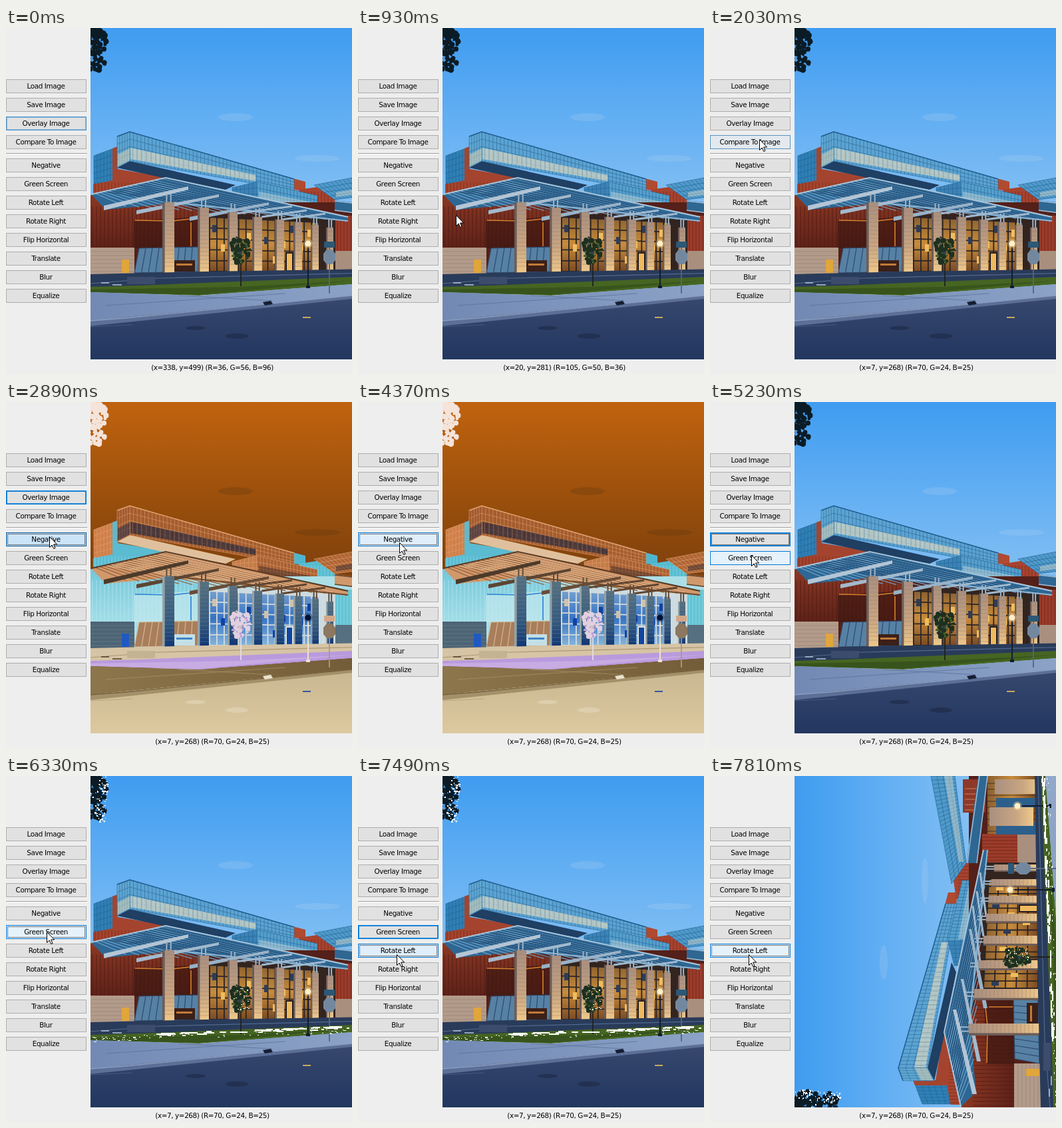
These frames come from a looping animation (520 px wide and 520 px high, 8 s). An HTML page:

```html
<!DOCTYPE html>
<html lang="en">
<head>
<meta charset="utf-8">
<title>Image editor</title>
<style>
  html, body { margin: 0; width: 100%; height: 100%; overflow: hidden; background: #eee; }
  svg { display: block; }
  text { font: 10.4px "DejaVu Sans", sans-serif; letter-spacing: -.4px; text-anchor: middle; fill: #000; }
</style>
</head>
<body>
<svg id="stage" width="520" height="520" viewBox="0 0 520 520">
  <defs>
    <linearGradient id="sky" x1="0" y1="0" x2="0" y2="1">
      <stop offset="0" stop-color="#3f9cf0"/><stop offset=".35" stop-color="#63aff3"/>
      <stop offset=".75" stop-color="#8cc4f3"/><stop offset="1" stop-color="#94c8f2"/>
    </linearGradient>
    <linearGradient id="road" x1="0" y1="0" x2="0" y2="1">
      <stop offset="0" stop-color="#3a4a70"/><stop offset="1" stop-color="#22365f"/>
    </linearGradient>
    <linearGradient id="walk" x1="0" y1="0" x2="1" y2="0">
      <stop offset="0" stop-color="#7289b4"/><stop offset="1" stop-color="#93a9cb"/>
    </linearGradient>
    <linearGradient id="stone" x1="0" y1="0" x2="0" y2="1">
      <stop offset="0" stop-color="#a98f80"/><stop offset=".6" stop-color="#c8a582"/>
      <stop offset="1" stop-color="#efc98a"/>
    </linearGradient>
    <linearGradient id="glow" x1="0" y1="0" x2="0" y2="1">
      <stop offset="0" stop-color="#8a6030"/><stop offset=".5" stop-color="#c78c3c"/>
      <stop offset="1" stop-color="#7a4a22"/>
    </linearGradient>
    <linearGradient id="wall" x1="0" y1="0" x2="0" y2="1">
      <stop offset="0" stop-color="#8d3822"/><stop offset="1" stop-color="#5c2118"/>
    </linearGradient>
  </defs>
  <svg x="127" y="0" width="393" height="498">
    <g id="photo"><g id="scene" transform="translate(-127 0)"></g></g>
  </svg>
  <path d="M0 188.5H122" stroke="#a0a0a0"/>
  <path d="M0 189.5H122" stroke="#fff"/>
  <g id="panel"></g>
  <text id="status" x="310" y="514"></text>
  <path id="cursor" d="M.5 .5V16.5L4.2 13 6.8 18.5 9 17.5 6.6 12H11.6Z" fill="#fff" stroke="#000"/>
</svg>
<script>
const $ = id => document.getElementById(id);
const LOOP = 8000;

/* ---------- picture ---------- */
let seed = 7;
const rnd = () => (seed = (seed * 16807) % 2147483647) / 2147483647;
const poly = (fill, pts, extra = '') => `<polygon fill="${fill}" points="${pts}" ${extra}/>`;
const rect = (fill, x, y, w, h) => `<rect fill="${fill}" x="${x}" y="${y}" width="${w}" height="${h}"/>`;
const line = (color, d, w = 1, extra = '') => `<path d="${d}" fill="none" stroke="${color}" stroke-width="${w}" ${extra}/>`;
const repeat = (n, f) => Array.from({ length: n }, (_, i) => f(i)).join('');

// Quad with nx by ny cells; corners clockwise from top left
function grid(fill, color, a, b, c, d, nx, ny, w = .6) {
  const at = (p, q, k) => (p[0] + (q[0] - p[0]) * k).toFixed(1) + ' ' + (p[1] + (q[1] - p[1]) * k).toFixed(1);
  let path = '';
  for (let i = 0; i <= nx; i++) path += `M${at(a, b, i / nx)}L${at(d, c, i / nx)}`;
  for (let j = 0; j <= ny; j++) path += `M${at(a, d, j / ny)}L${at(b, c, j / ny)}`;
  return poly(fill, [a, b, c, d].join(' ')) + line(color, path, w);
}

function leaves(fill, x, y, rx, ry, n, size) {
  return repeat(n, () => {
    const a = rnd() * 6.283, r = Math.sqrt(rnd());
    return `<circle fill="${fill}" cx="${(x + rx * r * Math.cos(a)).toFixed(1)}" cy="${(y + ry * r * Math.sin(a)).toFixed(1)}" r="${(size * (.5 + rnd())).toFixed(1)}"/>`;
  });
}

const stripes = (color, x, y, w, h, step) =>
  line(color, repeat(Math.floor(w / step), i => `M${x + i * step} ${y}v${h}`), .8);

const column = (x, y, w, foot) =>
  rect('#9db5c9', x + w * .3, y - 13, 2, 14) + rect('#9db5c9', x + w * .65, y - 13, 2, 14) +
  rect('url(#stone)', x, y, w, foot - y) +
  line('#8d7461', repeat(Math.floor((foot - y) / 6), i => `M${x} ${y + 6 * i}h${w}`), .4) +
  rect('#6c5c58', x, y, w * .2, foot - y);

const lamp = (x, y, foot) =>
  line('#141c2c', `M${x} ${y + 4}V${foot}`, 2) + rect('#141c2c', x - 3, foot - 3, 6, 4) +
  `<circle cx="${x}" cy="${y}" r="7" fill="#ffd890" opacity=".35"/><circle cx="${x}" cy="${y}" r="4.5" fill="#fff0c8"/>`;

function drawScene() {
  const sky = rect('url(#sky)', 127, 0, 498, 400) +
    '<g fill="#b5d3f0" opacity=".22"><ellipse cx="345" cy="134" rx="26" ry="6"/><ellipse cx="468" cy="196" rx="34" ry="5"/></g>';

  const upper =
    grid('#2f80b6', '#1f5f91', [132, 192], [167, 179], [167, 228], [132, 236], 7, 5) +
    poly('#a5442e', '131,235 160,229 160,181 168,178 168,212 300,234 300,246 131,250') +
    stripes('#742b20', 134, 232, 80, 17, 5) +
    poly('#1f3f63', '167,210 186,200 345,236 330,243 240,226') +
    poly('#b04a30', '404,219 450,231 450,245 404,240') +
    grid('#5ba3d2', '#2b6796', [186, 156], [433, 227], [433, 245], [186, 200], 44, 4) +
    poly('#d9d9c4', '187,180 375,221 375,230 187,197', 'opacity=".72"') +
    line('#5f87a6', repeat(26, i => `M${190 + 7 * i} ${180 + 1.55 * i}v${17 - .3 * i}`), .6) +
    grid('#5fa6d0', '#2f6d9c', [167, 163], [186, 156], [186, 200], [167, 210], 5, 4) +
    poly('#d9cfb0', '168,190 186,181 186,199 168,208', 'opacity=".55"') +
    line('#1e5c8e', 'M167 163L186 156L433 227', 1.4) +
    poly('#a8432f', '440,243 495,235 495,272 440,262') + stripes('#742b20', 444, 246, 50, 20, 5) +
    grid('#4f9aca', '#24608f', [463, 236], [625, 205], [625, 241], [494, 258], 26, 4) +
    poly('#cfd6cb', '496,247 625,225 625,237 496,254', 'opacity=".5"') +
    grid('#559fcd', '#276392', [377, 231], [468, 252], [468, 273], [377, 259], 18, 3) +
    grid('#3b83b6', '#276392', [340, 240], [377, 231], [377, 259], [340, 251], 6, 3) +
    poly('#cfdad6', '380,246 466,263 466,270 380,256', 'opacity=".45"');

  const lower =
    rect('#542019', 127, 262, 498, 110) +
    poly('url(#wall)', '127,251 240,258 290,275 290,332 127,331') +
    stripes('#4e1b15', 130, 268, 160, 63, 6) +
    poly('#3c1712', '192,290 288,284 288,331 192,331', 'opacity=".65"') +
    line('#d8802e', 'M194 289L250 290L286 286M247 296v32M278 292v36', 1.6) +
    rect('#b29b89', 127, 330, 66, 41) +
    line('#8c7770', repeat(6, i => `M127 ${336 + 6 * i}h66`), .5) +
    rect('#e0a63c', 174, 348, 11, 20) +
    grid('#5781a4', '#2c4c6e', [200, 331], [290, 329], [288, 366], [193, 368], 9, 1, 1.2) +
    rect('#3b2019', 252, 349, 32, 17) + rect('#c27a36', 256, 354, 24, 3) +
    rect('#33241f', 304, 280, 192, 88) +
    grid('url(#glow)', '#2b2426', [306, 284], [470, 292], [470, 366], [306, 366], 15, 5, 1.8) +
    repeat(12, i => rect(i % 3 ? '#f0bd5c' : '#2c3d58', 310 + i * 13, 296 + (i * 29) % 52, 6, 11)) +
    rect('#201c25', 420, 337, 12, 29) + rect('#efb95c', 422, 339, 8, 25);

  const right =
    rect('#9c3c2a', 495, 282, 43, 53) + stripes('#6b251b', 498, 282, 40, 53, 5) +
    rect('#a98f7e', 495, 335, 43, 31) +
    rect('url(#glow)', 538, 290, 87, 74) + stripes('#2b2426', 542, 290, 84, 74, 9) +
    rect('#2c5f8c', 537, 303, 18, 60) + rect('#2c5f8c', 578, 303, 14, 60) +
    rect('url(#stone)', 550, 293, 28, 66) + rect('url(#stone)', 598, 301, 22, 69) +
    rect('#8e382a', 570, 253, 50, 34) + stripes('#d59a62', 574, 256, 46, 28, 8) +
    poly('#2f6793', '494,259 520,262 625,276 625,290 520,278 494,274') +
    line('#9fc0d8', 'M494 260L520 263L625 278M494 274L625 290', 1.5);

  const canopy =
    poly('#2e6794', '128,250 240,225 514,284 514,291 390,279 245,264 150,273') +
    line('#72a8cc', repeat(17, i => `M${135 + i * 6.4} ${249 - i * 1.4}L${180 + i * 20} ${268 + i * 1.3}`), 1.1) +
    line('#1d446c', repeat(12, i => `M${150 + i * 8} ${246 - i * 1.8}L${260 + i * 21} ${262 + i * 2.2}`), 1) +
    line('#a9c6dc', 'M128 250L240 225L514 284', 2) +
    line('#8fb4d0', 'M252 262L390 277L514 290', 2) +
    poly('#b3c5d5', '147,267 274,238 274,243 147,274') +
    poly('#a3bacd', '196,274 320,250 320,254 196,280') +
    poly('#97b2c8', '276,284 395,262 395,266 276,290') +
    line('#9fb9cf', 'M345 279L430 268M384 284L452 274M414 288L480 279', 3) +
    column(235, 262, 18, 369) + column(288, 270, 17, 368) + column(333, 277, 15, 366) +
    column(370, 284, 15, 367) + column(404, 288, 14, 366) + column(432, 292, 13, 365) +
    column(458, 296, 12, 365) + column(481, 300, 11, 365);

  const ground =
    poly('#293b5a', '127,370 300,366 625,361 625,372 520,376 127,391') +
    line('#52698d', 'M127 384L230 376L625 366', 1.2) + rect('#3b4c6c', 182, 374, 42, 11) +
    line('#b6c6d6', 'M143 383h12M160 386h14', 1.6) +
    poly('#466522', '127,389 200,387 520,374 625,370 625,377 520,385 290,402 127,397') +
    poly('#2f4a18', '127,393 350,389 520,380 290,401 127,397', 'opacity=".6"') +
    poly('url(#walk)', '127,397 290,402 520,385 625,377 625,394 520,402 127,440') +
    line('#5b719a', 'M150 417L420 399M260 402L400 410', .8) +
    poly('url(#road)', '127,440 520,402 625,394 625,498 127,498') +
    poly('#5c6f96', '127,440 520,402 625,394 625,398 520,407 127,448') +
    line('#8a9dc0', 'M127 440L180 436L520 402L625 394', 1.4) +
    '<g fill="#1f2c4a" opacity=".7"><ellipse cx="347" cy="463" rx="17" ry="4"/><ellipse cx="285" cy="451" rx="15" ry="3"/></g>' +
    poly('#141d33', '386,412 398,410 401,415 389,417') + rect('#c8a860', 446, 434, 12, 2) +
    line('#46587f', 'M127 449L190 446', 1);

  const props =
    line('#1e2320', 'M353 340V388', 1.8) + leaves('#1d3020', 352, 333, 15, 21, 70, 2.4) +
    leaves('#48602c', 352, 336, 13, 18, 22, 1.3) +
    lamp(454, 324, 390) + lamp(580, 335, 385) +
    line('#56677c', 'M486 322V399', 1.8) + rect('#2c5877', 478, 321, 16, 9) +
    poly('#73889f', '482,333 490,333 495,339 495,349 490,355 482,355 477,349 477,339') +
    leaves('#0b1c26', 132, 20, 20, 20, 80, 3) + leaves('#0b1c26', 129, 50, 20, 16, 60, 3) +
    leaves('#0b1c26', 128, 10, 22, 12, 40, 3);

  const flecks = repeat(190, i => {
    const x = 127 + 498 * rnd(), top = 389 - (x - 127) * .038;
    const long = x > 225 && i % 3;
    const y = top + (long ? 1 + 5 * rnd() * rnd() : 3 + rnd() * (x < 300 ? 7 : 9));
    return rect('#fff', x.toFixed(0), y.toFixed(0), (long ? 4 + 9 * rnd() : 1 + 3 * rnd()).toFixed(0), long ? 2 : 1);
  }) + repeat(75, i => {
    const y = 70 * rnd(), reach = y < 40 ? 25 : 22;
    return rect('#fff', (127 + reach * Math.sqrt(rnd())).toFixed(0), y.toFixed(0), 1 + i % 3, 1 + i % 2);
  }) + repeat(24, () => rect('#fff', (339 + 26 * rnd()).toFixed(0), (316 + 38 * rnd()).toFixed(0), 2, 1));

  $('scene').innerHTML = sky + upper + lower + right + canopy + ground + props +
    `<g id="flecks" shape-rendering="crispEdges">${flecks}</g>`;
}

/* ---------- buttons ---------- */
const OVERLAY = 2, NEGATIVE = 4, GREEN = 5, LEFT = 6;
const labels = ['Load Image', 'Save Image', 'Overlay Image', 'Compare To Image', 'Negative', 'Green Screen',
  'Rotate Left', 'Rotate Right', 'Flip Horizontal', 'Translate', 'Blur', 'Equalize'];
const topOf = i => 77 + 28 * i + (i > 3 ? 7 : 0);

function drawPanel() {
  $('panel').innerHTML = labels.map((label, i) => {
    const y = topOf(i);
    return `<g><rect x=".5" y="${y + .5}" width="120" height="20"/>
      <rect x="1.5" y="${y + 1.5}" width="118" height="18" fill="none" stroke="#0078d7"/>
      <rect x="2.5" y="${y + 2.5}" width="116" height="16" fill="none" stroke="#000" stroke-dasharray="1 1"/>
      <text x="60" y="${y + 14}">${label}</text></g>`;
  }).join('');
}

/* ---------- timeline ---------- */
// Screen updates: first, last, count
const bursts = [[70, 70, 1], [230, 390, 3], [550, 1330, 11], [1410, 1790, 6], [1950, 2570, 9], [2810, 3050, 4],
  [3350, 3750, 6], [4370, 5150, 11], [5230, 5230, 1], [5390, 5710, 5], [6250, 6630, 6],
  [6950, 7490, 8], [7490, 7730, 4], [7810, 7810, 1]];
// Time, x, y
const path = [[150, 300, 560], [230, 262, 502], [310, 225, 410], [390, 201, 337], [470, 201, 337], [550, 192, 325],
  [950, 134, 268], [1330, 74, 186], [1410, 75, 176], [1570, 76, 159], [1790, 75, 158], [1940, 75, 158],
  [1950, 75, 163], [2030, 74, 167], [2190, 72, 178], [2570, 65, 202], [3270, 65, 202], [3750, 62, 211],
  [4530, 62, 211], [5070, 62, 230], [6170, 62, 230], [6630, 60, 242], [6870, 60, 242], [7290, 58, 268]];
// Time, red, green, blue under the pointer
const probe = [[230, 44, 63, 104], [310, 121, 140, 172], [390, 104, 121, 143], [550, 96, 106, 117],
  [750, 150, 84, 50], [950, 70, 24, 25]];
// Button, from, to
const presses = [[NEGATIVE, 2735, 2895], [NEGATIVE, 4360, 4480], [GREEN, 5380, 5500], [LEFT, 7480, 7640]];
const rings = [[OVERLAY, -300, -81], [OVERLAY, 2735, 2895], [NEGATIVE, 4680, 5380], [GREEN, 6920, 7560]];
const focus = [[NEGATIVE, 2735, 5380], [GREEN, 5380, 7480], [LEFT, 7480, LOOP]];

function lastUpdate(t) {
  let q = 0;
  for (const [from, to, n] of bursts) {
    if (t < from) break;
    const step = n > 1 ? (to - from) / (n - 1) : 1;
    q = from + Math.min(n - 1, Math.floor((t - from + .01) / step)) * step;
  }
  return q;
}

function track(keys, t) {
  const i = keys.findIndex(k => k[0] > t);
  if (i === 0) return keys[0].slice(1);
  if (i < 0) return keys[keys.length - 1].slice(1);
  const a = keys[i - 1], b = keys[i], k = (t - a[0]) / (b[0] - a[0]);
  return a.slice(1).map((v, j) => Math.round(v + (b[j + 1] - v) * k));
}

const during = (spans, i, t) => spans.some(([b, from, to]) => b === i && t >= from && t < to);
const fade = (test, t) => [0, 50, 100, 150].reduce((sum, d) => sum + (test(t - d) ? .25 : 0), 0);
const mix = (a, b, k) => a.map((v, i) => v + (b[i] - v) * k);
const rgb = c => `rgb(${c.map(Math.round)})`;

function hovers(i, t) {
  const [x, y] = track(path, t), top = topOf(i);
  return x < 121 && y >= top && y < top + 21;
}

function updateButton(node, i, t) {
  const [face, ring, dots] = node.children;
  const hover = fade(s => hovers(i, s), t);
  const press = fade(s => during(presses, i, s), t);
  const glow = fade(s => during(rings, i, s), t);
  face.setAttribute('fill', rgb(mix(mix([225, 225, 225], [229, 241, 251], hover), [204, 228, 247], press)));
  face.setAttribute('stroke', rgb(mix(mix([173, 173, 173], [0, 120, 215], Math.max(hover, glow)), [0, 84, 153], press)));
  ring.setAttribute('opacity', glow * .8);
  dots.setAttribute('opacity', during(focus, i, t) ? 1 : 0);
}

function statusText(t) {
  if (t < 230) return '(x=338, y=499) (R=36, G=56, B=96)';
  const s = Math.min(t, 950), [x, y] = track(path, s), [r, g, b] = track(probe, s);
  return `(x=${x - 127}, y=${y}) (R=${r}, G=${g}, B=${b})`;
}

function render(time) {
  const t = lastUpdate(time);
  [...$('panel').children].forEach((node, i) => updateButton(node, i, t));
  $('status').textContent = statusText(t);
  $('cursor').setAttribute('transform', `translate(${track(path, t)})`);
  $('photo').style.filter = t >= 2880 && t < 4440 ? 'invert(1)' : 'none';
  $('photo').setAttribute('transform', t >= 7560 ? 'translate(0 498) rotate(-90)' : '');
  $('flecks').setAttribute('display', t >= 5460 ? 'inline' : 'none');
}

drawScene();
drawPanel();
const start = performance.now();
function loop() {
  render((performance.now() - start) % LOOP);
  requestAnimationFrame(loop);
}
loop();
</script>
</body>
</html>
```
